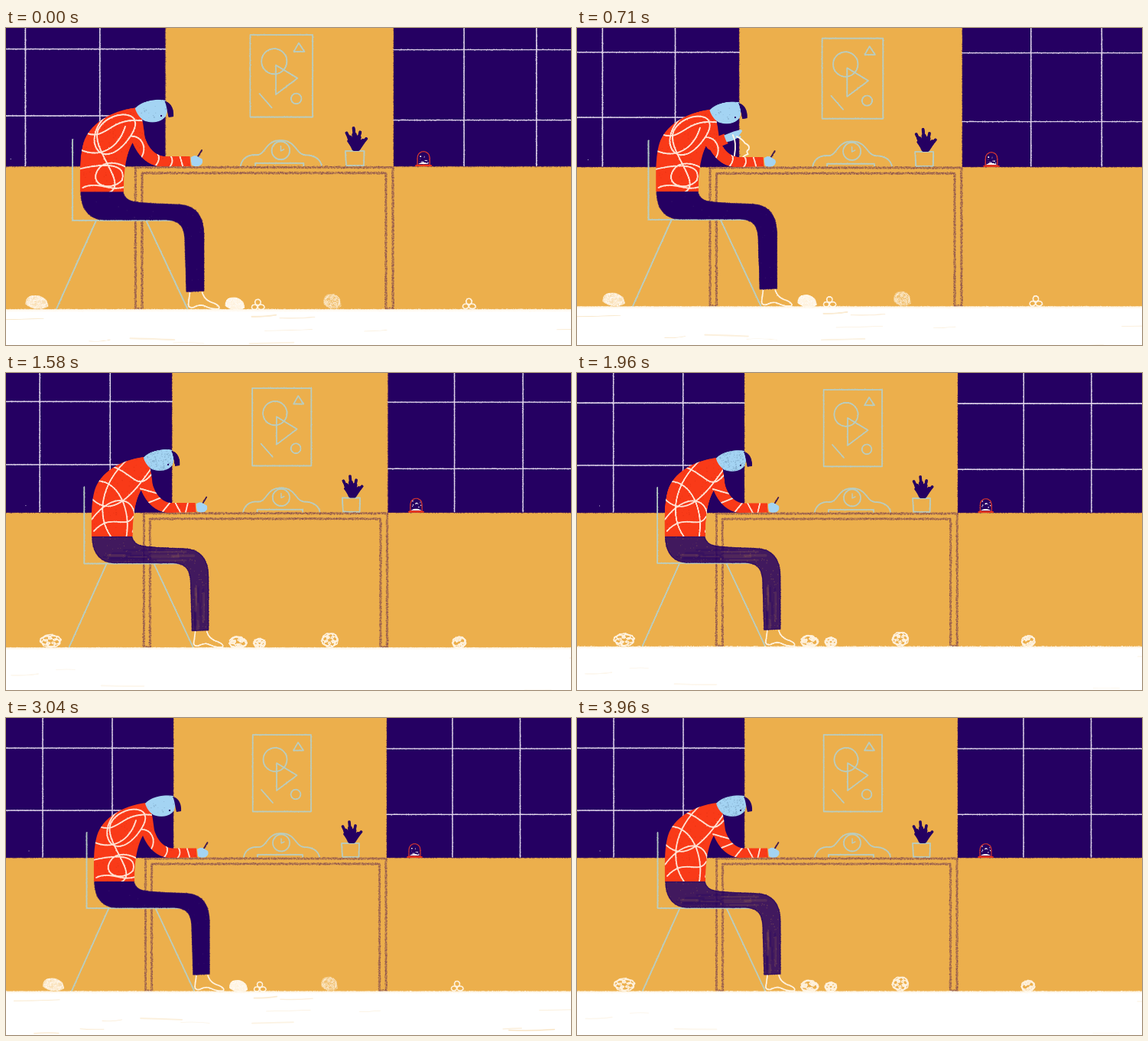
Recreate the animation shown at these times as an HTML page with a canvas. Size 739x415 px, loop 4 s.

```html
<!DOCTYPE html>
<html lang="en">
<head>
<meta charset="utf-8">
<title>Writing at the desk</title>
<style>
  html, body { margin: 0; width: 100%; height: 100%; overflow: hidden; background: #ecaf4c; }
  canvas { display: block; width: 739px; height: 415px; }
</style>
</head>
<body>
<canvas id="stage" width="739" height="415"></canvas>
<script>
const W = 739, H = 415, LOOP = 4000, FPS = 24, RES = 2;
const WALL = '#ecaf4c', NAVY = '#250062', RED = '#f93a18', SKIN = '#a4d4f3',
      PALE = '#b8cfc6', CREAM = '#fff6e6', DESK = '#7d4550', LILAC = '#ebe4f4';

const SHIRT = 'M115 214C115 190 114 172 119 154C126 131 152 115 183 111C191 117 192 133 194 147' +
  'C198 160 206 169 217 170.5L249 170.5L250 182.5L213 183C198 182 186 171 179 154C172 166 168 185 168 214Z';
const PANTS = 'M116 214L167 214C169 222 174 226 186 227C204 229 222 229 238 230C258 232 266 246 266 268L266 335' +
  'L245 336L243 272C242 255 236 249 220 248L145 248C126 248 116 235 116 214Z';
const HEAD = 'M182 112C190 103 206 100 219 102C222 108 222 117 219 122C213 130 201 130 193 127C187 123 184 118 182 112Z';

// One entry per drawing of the boiling line
const LOOKS = [
  { pants: [1, 60, 0], head: 20, floor: 14, balls: 'smudge', shirt:
    'M152 116C112 148 140 192 172 152S152 112 138 136S176 204 150 215M114 162C140 174 162 160 170 134' +
    'M114 186C148 178 172 180 166 200C152 214 128 206 135 190S162 178 171 184M122 142C148 152 150 122 192 127M118 209C136 200 150 214 169 208' },
  { pants: [.74, 1100, 10], head: 90, floor: 6, balls: 'outline', shirt:
    'M114 168C138 148 160 150 190 126M128 136C150 160 120 190 124 214M152 115C146 150 164 180 160 214' +
    'M114 190C140 184 152 160 176 158M140 214C118 184 146 148 150 190S128 212 168 200M166 113C176 130 168 150 178 156' },
  { pants: [.88, 500, 12], head: 70, floor: 10, balls: 'outline', shirt:
    'M114 172C140 140 172 160 150 188S120 200 138 172M126 136C164 146 170 190 146 214M164 112C132 134 150 160 192 132' +
    'M114 200C146 186 160 210 169 186M150 116C120 152 130 190 168 170' },
  { pants: [.86, 250, 22], head: 160, floor: 5, balls: 'scribble', shirt:
    'M122 142C150 142 166 180 160 214M164 112C124 146 122 190 140 214M114 164C140 190 164 166 192 126' +
    'M115 192C146 150 182 166 168 208M138 122C170 132 174 156 192 134M118 207C140 182 160 206 169 188' }
];
const CUFFS = ['M178 146C192 146 198 164 187 175M207 164C215 172 210 180 203 186M224 168C231 176 226 182 222 186M236 168L241 185',
               'M178 152L199 158M184 172L204 164M205 184L218 168M222 168L231 185M240 168L236 185'];
const PILES = [[62, 349, 14, 8.5], [304, 351, 12, 8], [332, 352, 8, 6.5], [423, 348, 11, 9.5], [590, 351, 9, 8]];

let seed = 1;
function rnd() {
  seed = (seed * 1664525 + 1013904223) >>> 0;
  return seed / 4294967296;
}
const spread = w => (rnd() - .5) * w;

function fill(g, d, color, alpha = 1) {
  g.globalAlpha = alpha;
  g.fillStyle = color;
  g.fill(new Path2D(d));
  g.globalAlpha = 1;
}

function line(g, d, w, color, alpha = 1) {
  g.globalAlpha = alpha;
  g.strokeStyle = color;
  g.lineWidth = w;
  g.lineCap = g.lineJoin = 'round';
  g.stroke(new Path2D(d));
  g.globalAlpha = 1;
}

const ruler = document.createElementNS('http://www.w3.org/2000/svg', 'path');
// A stroke with a crumbly edge
function chalk(g, d, w, color, base = .95, dabs = 1) {
  if (base) line(g, d, w * .85, color, base);
  ruler.setAttribute('d', d);
  const len = ruler.getTotalLength();
  g.fillStyle = color;
  g.globalAlpha = .6;
  for (let s = 0; s < len; s++) {
    const p = ruler.getPointAtLength(s);
    for (let i = 0; i < dabs; i++) {
      const r = .5 + rnd() * .7;
      g.fillRect(p.x + spread(w) - r / 2, p.y + spread(w) - r / 2, r, r);
    }
  }
  g.globalAlpha = 1;
}

function specks(g, d, [x, y, w, h], n, color, alpha = .4) {
  g.save();
  g.clip(new Path2D(d));
  g.fillStyle = color;
  g.globalAlpha = alpha;
  for (let i = 0; i < n; i++) {
    const r = .5 + rnd();
    g.fillRect(x + rnd() * w, y + rnd() * h, r, r);
  }
  g.restore();
}

const rect = (x, y, w, h) => `M${x} ${y}h${w}v${h}h${-w}Z`;
const oval = (x, y, rx, ry = rx) => `M${x - rx} ${y}a${rx} ${ry} 0 1 1 ${2 * rx} 0a${rx} ${ry} 0 1 1 ${-2 * rx} 0Z`;

// A looping knot: one circle riding on another
function knot(x, y, rx, ry, turns) {
  const p1 = rnd() * 6, p2 = rnd() * 6, ratio = 3.2 + rnd();
  const pts = Array.from({ length: turns * 20 }, (_, i) => {
    const a = i * Math.PI / 10 + p1, b = a * ratio + p2;
    return [x + rx * (.62 * Math.cos(a) + .38 * Math.cos(b)), y + ry * (.62 * Math.sin(a) + .38 * Math.sin(b))];
  });
  return 'M' + pts.join('L');
}

function layer(draw, v) {
  const c = document.createElement('canvas');
  c.width = W * RES;
  c.height = H * RES;
  const g = c.getContext('2d');
  g.scale(RES, RES);
  draw(g, v);
  return c;
}

function leaf(g, x, y) {
  const x0 = 452 + (x - 452) * .2;
  line(g, `M${x0} 161Q${(x0 + x) / 2} ${(161 + y) / 2 + 2} ${x} ${y + 3}`, 3.6, NAVY);
  line(g, `M${x0} 161L${x0 + (x - x0) * .6} ${161 + (y - 161) * .6}`, 6, NAVY);
}

function drawRoom(g, v) {
  seed = 11;
  g.fillStyle = WALL;
  g.fillRect(0, 0, W, H);
  fill(g, rect(-2, -2, 221, 185) + rect(498, -2, 243, 185), NAVY);
  chalk(g, 'M219 0V183M498 0V183M0 183H182M498 183H739', 1.4, '#56234f', .2);
  chalk(g, 'M48 0V182M139 0V182M0 39.4H219M0 121H219M584 0V182M672.5 0V182M498 40.2H739M498 126.3H739', 1.7, LILAC, .9);

  seed = 40 + v;
  const art = rect(322.7, 22, 76.3, 100.5) + oval(352, 54.5, 15.5) + 'M382 32L376 42.5L389 42.5Z' +
    'M354 59L380.5 75L354 95Z' + 'M334 94L349 111' + oval(379, 100, 6.3);
  chalk(g, art, 2, PALE);
  const clock = 'M311 182C313 172 321 168 331 169C342 168 341 151 360 151C379 151 378 168 390 169C400 169 408 173 410 182' +
    'M329 182V179H388V182' + oval(360, 163.5, 11);
  chalk(g, clock, 2, PALE);
  chalk(g, 'M360 158V164L364 162', 1.5, PALE);
  chalk(g, 'M439 164H462L461.5 182H440Z', 2, PALE);
  [[449, 133], [440.5, 139], [457, 138], [464.5, 146], [443, 149]].forEach(([x, y]) => leaf(g, x, y));

  const dome = 'M527 181V173C527 162 542 162 542 173V181Z';
  fill(g, dome, NAVY);
  specks(g, dome, [529, 167, 11, 11], 11, '#fff', 1);
  fill(g, 'M528 180Q534 176 541 180Z', '#fff');
  chalk(g, dome, 1.3, '#d93931');
  chalk(g, 'M525 182H544', 2, RED);
  fill(g, oval(30, 174, .6), LILAC, .7);
}

function drawFloor(g, v) {
  g.fillStyle = '#fff';
  g.fillRect(0, 358.5, W, 60);
  chalk(g, 'M0 358.8H739', 3, '#fffaf0', .7, 3);
  for (let i = 0; i < LOOKS[v].floor; i++) {
    const x = rnd() * W, y = 366 + rnd() * 47, w = 15 + rnd() * 45;
    const alpha = v ? .1 : .1 + rnd() * .25;
    line(g, `M${x} ${y}q${w / 2} ${spread(3)} ${w} ${spread(4)}`, .5 + rnd() * 1.3, WALL, alpha);
  }
}

function drawPiles(g, v) {
  const style = LOOKS[v].balls;
  PILES.forEach(([x, y, rx, ry], i) => {
    const box = [x - rx, y - ry, rx * 2, ry * 2];
    if (style === 'smudge' && (i < 2 || i === 3)) {
      const blob = `M${x - rx} ${y + ry * .3}C${x - rx} ${y - ry} ${x - rx * .4} ${y - ry} ${x} ${y - ry}` +
        `S${x + rx} ${y - ry * .3} ${x + rx} ${y + ry * .6}C${x + rx * .5} ${y + ry * 1.2} ${x - rx * .5} ${y + ry} ${x - rx} ${y + ry * .3}Z`;
      fill(g, blob, CREAM, [.7, .95, 0, .25][i]);
      specks(g, blob, box, 160, i === 3 ? '#f8dfb0' : '#fff', .75);
      chalk(g, knot(x, y, rx * .9, ry * .9, 2), 1, CREAM, .3);
    } else if (style === 'smudge') {
      chalk(g, oval(x, y - 3, 3.5) + oval(x - 4, y + 3, 3.5, 3) + oval(x + 4, y + 3, 4, 3), 1.7, CREAM);
    } else {
      chalk(g, knot(x, y, rx, ry, style === 'outline' ? 1.5 : 3), 1.6, CREAM, .9);
    }
  });
}

function drawDesk(g) {
  const desk = 'M182.5 357V184H497V357H488.5V191H190.5V357Z';
  chalk(g, desk, 3, DESK, .3, 3);
}

function drawPerson(g, v) {
  const look = LOOKS[v], [solid, grains, streaks] = look.pants;
  chalk(g, 'M105.5 150V249H228M134 250L86 357M196 250L246 357', 2.1, PALE);

  const foot = 'M249 337L247 352Q248 357 254 355Q262 351 268 354Q276 358 284 357Q287 354 278 350Q267 347 264 337';
  fill(g, foot, WALL);
  chalk(g, foot, 1.9, CREAM);

  fill(g, PANTS, NAVY, solid);
  specks(g, PANTS, [115, 212, 152, 125], grains * 2, v ? '#a8764f' : '#4c2a76', .35);
  g.save();
  g.clip(new Path2D(PANTS));
  for (let i = 0; i < streaks; i++) {
    const c = i % 2 ? '#8a5a50' : NAVY, o = spread(16), x = 130 + rnd() * 70, y = 275 + rnd() * 30;
    const along = i % 4 < 2 ? `M${x} ${238 + o}h${20 + rnd() * 40}` : `M${255 - o} ${y}v${15 + rnd() * 30}`;
    line(g, along, 1.5 + rnd() * 3, c, .28);
  }
  g.restore();
  chalk(g, PANTS, 1.5, NAVY, .75);

  fill(g, SHIRT, RED);
  specks(g, SHIRT, [113, 110, 138, 104], 350, '#d92d13', .4);
  g.save();
  g.clip(new Path2D(SHIRT));
  chalk(g, look.shirt, 2.1, '#ffe9dc');
  chalk(g, CUFFS[v % 2], 2.1, '#ffe9dc');
  g.restore();

  fill(g, HEAD, SKIN);
  specks(g, HEAD, [182, 100, 40, 30], look.head, '#6f93b4', .5);
  fill(g, 'M218 103C225 104 230 112 229 122L223 123C221 116 221 109 218 103Z', NAVY);
  fill(g, oval(214, 121, 1.1), NAVY);

  chalk(g, 'M258 172L263.5 163', 2, '#3b1450');
  fill(g, 'M250 172Q255 168 259 171L264 174Q266 179 261 182Q255 184 251 181Z', SKIN);
}

function drawFront(g, v) {
  seed = 90 + v * 17;
  drawDesk(g);
  drawPiles(g, v);
  drawPerson(g, v);
  drawFloor(g, v);
}

const looks = LOOKS.map((_, v) => [layer(drawRoom, v), layer(drawFront, v)]);

// Rows: step, scale
const ZOOM = [[0, 1.0704], [17, 1.0456], [26, 1.0304], [38, 1.012], [48, 1]];
// Rows: step, elbow x y, hand x y, hand lean
const ARM = [[9, 196, 164, 236, 176, 0], [14, 188, 161, 218, 152, 0], [17, 184, 155, 212, 144, 0],
  [20, 187, 160, 213, 149, 0], [22, 199, 132, 208, 86, 0], [23, 196, 116, 187, 66, -.4],
  [26, 194, 112, 182, 65, -.35], [29, 199, 130, 210, 92, 0], [32, 192, 158, 222, 152, 0], [35, 196, 164, 236, 176, 0]];

function at(rows, n) {
  if (n <= rows[0][0]) return rows[0].slice(1);
  const i = rows.findIndex(r => r[0] >= n);
  if (i < 0) return rows[rows.length - 1].slice(1);
  const a = rows[i - 1], b = rows[i], k = (n - a[0]) / (b[0] - a[0]);
  return a.slice(1).map((x, j) => x + (b[j + 1] - x) * k);
}

function ball(g, x, y, r, v) {
  seed = 300 + v;
  line(g, knot(x, y, r, r, 2), 1.6, LILAC, .95);
}

function drawArm(g, n, v) {
  const [ex, ey, hx, hy, lean] = at(ARM, n);
  const a = Math.atan2(hy - ey, hx - ex), cx = hx - Math.cos(a) * 10, cy = hy - Math.sin(a) * 10;
  g.lineCap = 'butt';
  g.lineJoin = 'round';
  g.strokeStyle = RED;
  g.lineWidth = 13;
  g.stroke(new Path2D(`M170 132L${ex} ${ey}L${cx} ${cy}`));

  g.save();
  g.translate(hx, hy);
  g.rotate(a + lean);
  fill(g, 'M-11 -5Q-3 -5 2 -5L11 -4Q14 -2 10 0L4 4Q-4 6 -11 4Z', SKIN);
  line(g, 'M3 3L7 4', 2.6, SKIN);
  g.restore();

  if (n >= 11 && n < 19) {
    g.save();
    g.translate(hx, hy);
    line(g, 'M-1 -1Q4 8 1 25M4 1Q11 4 14 9Q21 12 19 17Q15 19 18 23Q12 25 10 29', 1.8, CREAM);
    g.restore();
  } else if (n >= 19 && n < 23) {
    ball(g, hx + Math.cos(a) * 8, hy + Math.sin(a) * 8, 8, v);
  }
}

const g = document.getElementById('stage').getContext('2d');

function render(t) {
  const n = Math.min(95, Math.floor((t + 5) * FPS / 1000));
  const v = (n >> 1) % 4, [s] = at(ZOOM, n), [room, front] = looks[v];
  g.setTransform(s, 0, 0, s, W / 2 * (1 - s), H / 2 * (1 - s));
  g.drawImage(room, 0, 0, W, H);
  if (n >= 10 && n < 35) drawArm(g, n, v);
  g.drawImage(front, 0, 0, W, H);
  if (n >= 23 && n < 28) {
    const k = n - 23;
    ball(g, 180 - 47.7 * k, 58 - 5 * k + 9.2 * k * k, 11, v);
  }
}

const start = performance.now();
function tick() {
  render((performance.now() - start) % LOOP);
  requestAnimationFrame(tick);
}
tick();
</script>
</body>
</html>
```
